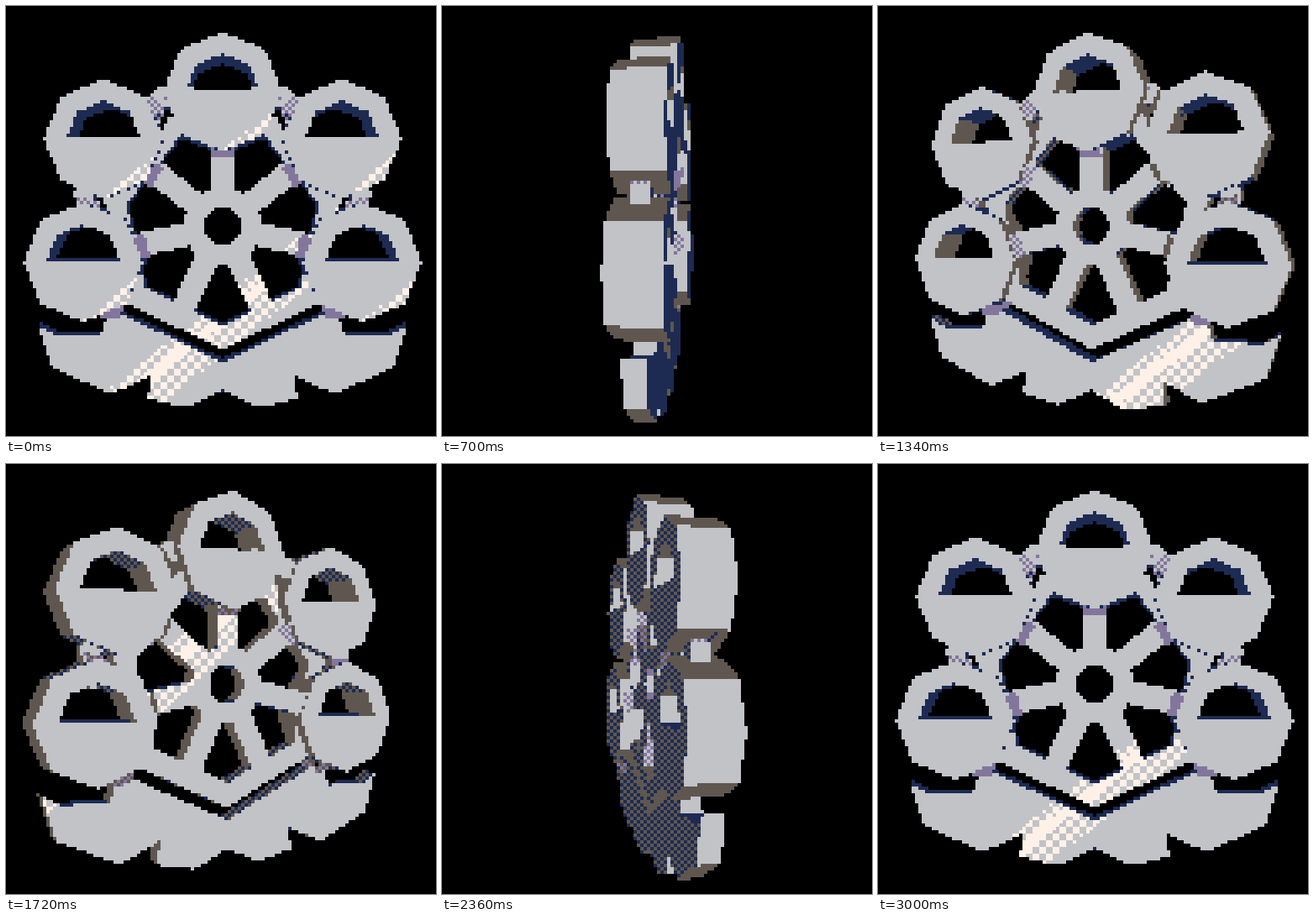
Recreate the animation shown at these times as an HTML page with a canvas. Size 512 by 512 pixels, loop 3.02 s.

```html
<!DOCTYPE html>
<html lang="en">
<head>
<meta charset="utf-8">
<title>Turning wheel</title>
<style>
html, body { margin: 0; width: 100%; height: 100%; overflow: hidden; background: #000; }
canvas { display: block; width: 100vw; height: 100vh; image-rendering: pixelated; }
</style>
</head>
<body>
<canvas id="view" width="128" height="128"></canvas>
<script>
const SIZE = 128, CELL = 4;
const CX = 258, CY = 256, HUB = 6;      // view centre, hub offset below it
const DIST = 900, FOCAL = 872;          // camera distance and focal length
const CABIN = 28, WHEEL = 12;           // half thicknesses
const STEP = 20, STEPS = 151, HALF = 1510;
const RAD = Math.PI / 180, SLICE = 360 / 7;

const BLACK = [0, 0, 0], NAVY = [29, 43, 83], BROWN = [95, 87, 79],
      MAUVE = [131, 118, 156], GREY = [194, 195, 199], WHITE = [255, 241, 232];

const ctx = document.getElementById('view').getContext('2d');
const img = ctx.createImageData(SIZE, SIZE);
const depth = new Float32Array(SIZE * SIZE);
const faces = [];

// ---- model ----

function normalOf(a, b, c) {
  const u = b.map((v, i) => v - a[i]), w = c.map((v, i) => v - a[i]);
  const n = [u[1] * w[2] - u[2] * w[1], u[2] * w[0] - u[0] * w[2], u[0] * w[1] - u[1] * w[0]];
  const len = Math.hypot(...n) || 1;
  return n.map(v => v / len);
}

function addQuad(...pts) {
  faces.push({ loops: [pts], n: normalOf(pts[0], pts[1], pts[2]) });
}

// Slope from the low edge a-b up to the high edge c-d, on both sides.
function addRamp(a, b, c, d, low, high) {
  for (const side of [1, -1]) {
    addQuad([...a, low * side], [...b, low * side], [...c, high * side], [...d, high * side]);
  }
}

// Loops are given as they look on the near face when seen straight on.
function extrude(loops, h, glint) {
  const k = (DIST - h) / FOCAL;
  const flat = loops.map(loop => loop.map(([x, y]) => [x * k, y * k]));
  for (const z of [h, -h]) {
    faces.push({ loops: flat.map(l => l.map(([x, y]) => [x, y, z])), n: [0, 0, 1], glint });
  }
  for (const l of flat) {
    l.forEach(([x, y], i) => {
      const [p, q] = l[(i + 1) % l.length];
      addQuad([x, y, h], [p, q, h], [p, q, -h], [x, y, -h]);
    });
  }
}

// Point at radius r and angle a from the hub, moved sideways by off.
function polar(r, a, off = 0) {
  const c = Math.cos(a * RAD), s = Math.sin(a * RAD);
  return [r * c - off * s, HUB - r * s - off * c];
}

function ngon(cx, cy, r, n) {
  return Array.from({ length: n }, (_, i) => {
    const a = i * 2 * Math.PI / n;
    return [cx + r * Math.cos(a), cy + r * Math.sin(a)];
  });
}

function addCabin(x, y) {
  const dome = ngon(x, y - 1, 44, 8).filter(p => p[1] < y);
  extrude([ngon(x, y, 71, 8), dome], CABIN, { x, y, disc: true });

  // sloped joint between spoke and cabin
  const a = Math.atan2(HUB - y, x) / RAD;
  const r = Math.hypot(x, y - HUB) - 77;
  addRamp(polar(r, a, -14), polar(r, a, 14), polar(r + 14, a, 14), polar(r + 14, a, -14),
          WHEEL, CABIN - 1);
}

function addWheel() {
  const rim = [], gaps = [];
  for (let i = 0; i < 7; i++) {
    const mid = -90 + i * SLICE, a = mid - SLICE / 2, b = mid + SLICE / 2;
    rim.push(polar(147, mid));
    if (i > 0 && i < 6) rim.push(polar(114, b));   // tucked in behind the cabins
    gaps.push([polar(44, a, 14), polar(106, a, 14), polar(118, mid),
               polar(106, b, -14), polar(44, b, -14)]);
  }
  extrude([rim, ngon(0, HUB, 23, 12), ...gaps], WHEEL, { x: 0, y: HUB });
}

function addLinks() {
  for (let i = 2; i < 6; i++) {
    const mid = -90 + i * SLICE;
    extrude([[polar(146, mid - 14), polar(158, mid), polar(146, mid + 14),
              polar(168, mid + 14), polar(182, mid), polar(168, mid - 14)]], 10);
    for (const dir of [1, -1]) {
      const at = (r, a) => polar(r, mid + a * dir);
      addRamp(at(157, 1.5), at(181, 1.5), at(176, 7), at(152, 7), 10, CABIN - 1);
    }
  }
}

function addBase() {
  const right = [[120, 367], [138, 373], [146, 392], [200, 392], [220, 380],
                 [204, 430], [133, 462], [86, 441], [89, 468], [42, 478]];
  const left = right.map(([x, y]) => [-x, y]).reverse();
  const outline = [[0, 424], ...right, [0, 458], ...left];
  extrude([outline.map(([x, y]) => [x, y - CY])], WHEEL, { x: 0, y: HUB });
  for (const s of [1, -1]) {
    addRamp([s * 124, 120], [s * 146, 120], [s * 146, 106], [s * 124, 106], WHEEL, CABIN - 1);
  }
}

addCabin(0, -154);
for (const side of [-1, 1]) {
  addCabin(side * 142, -98);
  addCabin(side * 166, 49);
}
addWheel();
addLinks();
addBase();

// ---- shading ----

function tone(light) {
  if (light < 0.15) return [NAVY, NAVY];
  if (light < 0.275) return [NAVY, BROWN];
  if (light < 0.5) return [BROWN, BROWN];
  if (light < 0.62) return [BROWN, MAUVE];
  if (light < 0.7) return [MAUVE, MAUVE];
  if (light < 0.89) return [MAUVE, GREY];
  return [GREY, GREY];
}

// Where the diagonal glint lies at time t, measured from the part's centre.
function glintAt(t, disc) {
  if (disc) return 82 - t * (t < 0 ? 1.25 : 1);
  return t < 0 ? 120 - 0.8 * t - 0.0006 * t * t : 120 - 0.9 * t;
}

// ---- rendering ----

function drawFace(face, cos, sin, t) {
  const turn = ([x, y, z]) => [x * cos + z * sin, y, z * cos - x * sin];
  const n = turn(face.n);
  const loops = face.loops.map(l => l.map(turn));
  const p = loops[0][0];
  const plane = n[0] * p[0] + n[1] * p[1] + n[2] * (p[2] - DIST);
  if (Math.abs(plane) < 1e-6) return;

  const flat = loops.map(l => l.map(([x, y, z]) => {
    const s = FOCAL / (DIST - z);
    return [x * s + CX, y * s + CY];
  }));
  const ys = flat.flat().map(q => q[1] / CELL);
  const top = Math.max(0, Math.floor(Math.min(...ys)));
  const end = Math.min(SIZE - 1, Math.ceil(Math.max(...ys)));

  const light = Math.abs(n[2]);
  const colors = tone(light);
  const glint = light > 0.7 && face.glint;
  const centre = glint && glintAt(t, glint.disc);
  const flip = Math.sign(cos);
  const scale = (DIST - Math.abs(face.loops[0][0][2])) / FOCAL;

  for (let row = top; row <= end; row++) {
    const y = (row + 0.5) * CELL, hits = [];
    for (const l of flat) {
      l.forEach(([x0, y0], i) => {
        const [x1, y1] = l[(i + 1) % l.length];
        if ((y0 <= y) !== (y1 <= y)) hits.push(x0 + (y - y0) * (x1 - x0) / (y1 - y0));
      });
    }
    hits.sort((a, b) => a - b);
    for (let i = 0; i + 1 < hits.length; i += 2) {
      const from = Math.max(0, Math.ceil(hits[i] / CELL - 0.5));
      const to = Math.min(SIZE, Math.ceil(hits[i + 1] / CELL - 0.5));
      for (let col = from; col < to; col++) {
        const u = (col + 0.5) * CELL - CX, v = y - CY;
        const w = plane / ((n[0] * u + n[1] * v) / FOCAL - n[2]);
        const at = row * SIZE + col;
        if (!(w > 0 && w < depth[at])) continue;
        depth[at] = w;
        let c = colors[(row + col) & 1];
        if (glint) {
          const wx = u * w / FOCAL, wz = DIST - w;
          const ox = (wx * cos - wz * sin) / scale, oy = v * w / FOCAL / scale;
          const off = 0.8 * (ox - glint.x) * flip + oy - glint.y - centre;
          if (Math.abs(off) < (glint.disc ? 13 : 34)) {
            const core = !glint.disc && Math.abs(off + 10) < 8;
            if (core || ((row >> 1) + (col >> 1)) & 1) c = WHITE;
          }
        }
        put(at, c);
      }
    }
  }
}

function put(at, c) {
  img.data.set(c, at * 4);
  img.data[at * 4 + 3] = 255;
}

function render(step) {
  depth.fill(Infinity);
  for (let i = 0; i < SIZE * SIZE; i++) put(i, BLACK);
  const yaw = step * 2.4 * RAD;
  const t = (step * STEP + 560) % HALF - 560;
  const cos = Math.cos(yaw), sin = Math.sin(yaw);
  for (const face of faces) drawFace(face, cos, sin, t);
  ctx.putImageData(img, 0, 0);
}

let start = null, last = -1;
function tick(now) {
  if (start === null) start = now;
  const step = Math.floor((now - start) / STEP) % STEPS;
  if (step !== last) render(last = step);
  requestAnimationFrame(tick);
}
render(0);
requestAnimationFrame(tick);
</script>
</body>
</html>
```
